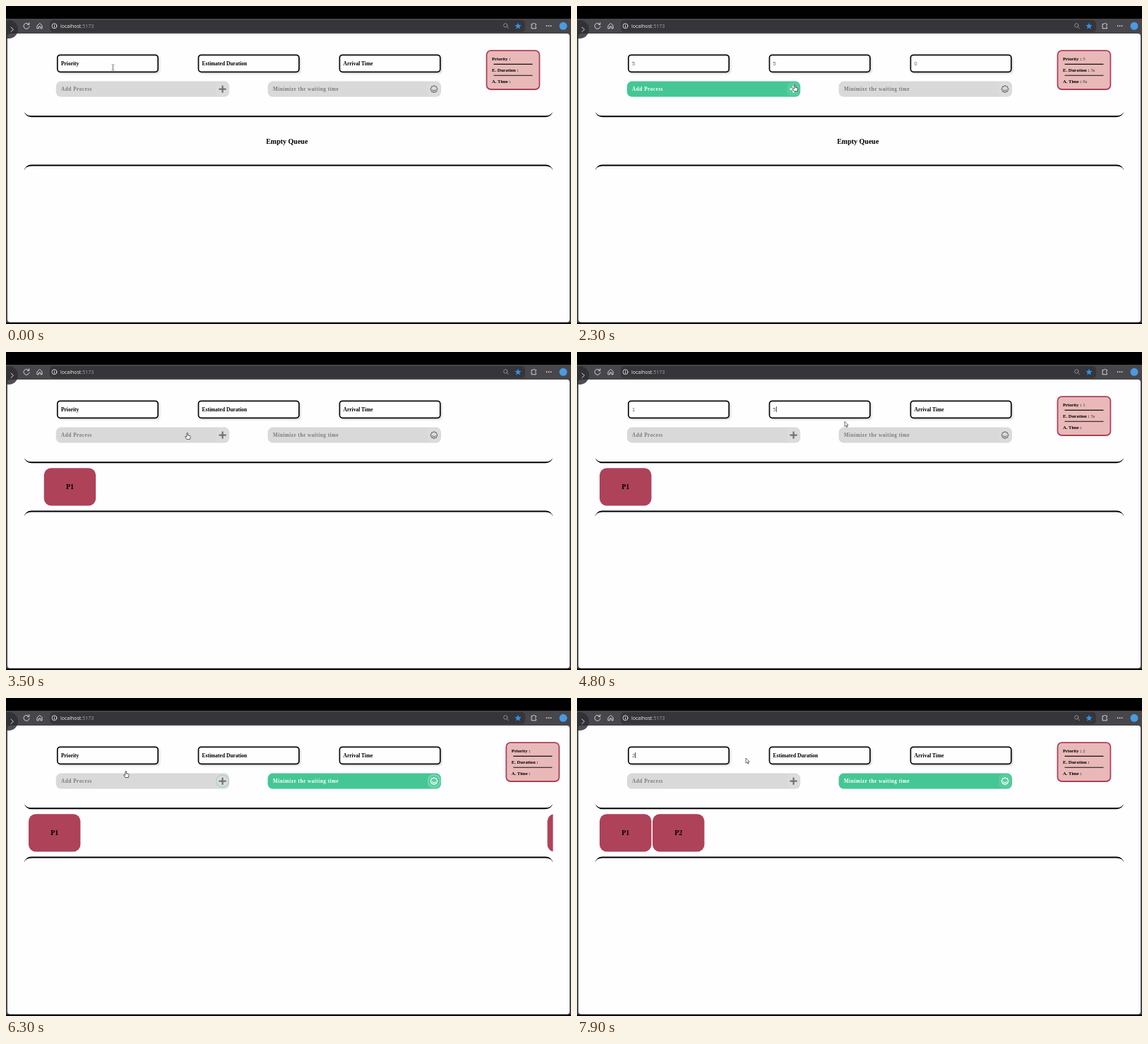
Write an HTML page that moves like this. It is 800 by 450 pixels and loops after 8000 ms.

```html
<!DOCTYPE html>
<html lang="en">
<head>
<meta charset="utf-8">
<title>Process queue</title>
<style>
  html, body { margin: 0; width: 100%; height: 100%; overflow: hidden; background: #000; }
  svg { display: block; width: 100%; height: 100%; }
  text { white-space: pre; }
  .serif { font-family: "Liberation Serif", "Times New Roman", serif; font-weight: bold; }
  .ui { font-family: "Open Sans", sans-serif; }
  .value { font: 7.5px "Liberation Sans", Arial, sans-serif; fill: #666; }
  .line { fill: none; stroke: #d5d5d8; stroke-width: 1; stroke-linecap: round; stroke-linejoin: round; }
</style>
</head>
<body>
<svg id="stage" viewBox="0 0 800 450">
  <defs>
    <clipPath id="page"><rect x="2" y="39" width="796" height="409" rx="4"/></clipPath>
    <clipPath id="lane"><rect x="26" y="150" width="748.5" height="80"/></clipPath>
    <filter id="soft" x="-10%" y="-30%" width="120%" height="170%"><feGaussianBlur stdDeviation="1.5"/></filter>
    <path id="rail" d="M26 149A10 8.3 0 0 0 36 157.3H764A10 8.3 0 0 0 774 149A10 6.3 0 0 1 764 155.3H36A10 6.3 0 0 1 26 149Z"/>
  </defs>

  <rect width="800" height="450"/>
  <rect y="18" width="800" height="430" fill="#47474b"/>
  <rect x="62" y="20" width="673" height="17" rx="5" fill="#36363a"/>
  <rect x="2" y="39" width="796" height="408.5" rx="4" fill="#fefdff"/>

  <circle cx="4" cy="33" r="13" fill="#2f2f32" opacity=".85"/>
  <path class="line" d="M7 30L10.5 33.2L7 36.4" stroke="#aaa"/>
  <path class="line" d="M32.3 26A4 4 0 1 0 33 29M32.8 23.7V26.3H30.2"/>
  <path class="line" d="M44.3 27.6L47.7 24.5L51.1 27.6V31.8H49V29H46.4V31.8H44.3Z"/>
  <circle class="line" cx="68.5" cy="28.2" r="3.5" stroke-width=".8"/>
  <path class="line" d="M68.5 28V30M68.5 26.4V26.5" stroke-width=".8"/>
  <text class="ui" x="77" y="30.7" font-size="7" fill="#f2f2f2">localhost<tspan fill="#a4a4a8">:5173</tspan></text>
  <circle class="line" cx="707.3" cy="27.4" r="2.7" style="stroke:#8b8b90"/>
  <path class="line" d="M709.4 29.6L711.6 31.8" style="stroke:#8b8b90"/>
  <path id="star" fill="#2f8fe8"/>
  <path class="line" d="M744.5 25.4H746.3A1.4 1.4 0 0 1 749 25.4H750.4V27.2A1.3 1.3 0 0 0 750.4 29.7V31.8H744.5Z"/>
  <g fill="#d5d5d8"><circle cx="765.6" cy="28.2" r=".9"/><circle cx="768.6" cy="28.2" r=".9"/><circle cx="771.6" cy="28.2" r=".9"/></g>
  <circle cx="789" cy="28.3" r="5.5" fill="#4a9be0"/>

  <g id="form"></g>
  <use href="#rail"/>
  <use href="#rail" transform="matrix(1 0 0 -1 0 381.8)"/>
  <text id="empty" class="serif" x="397.8" y="195" font-size="10" text-anchor="middle">Empty Queue</text>
  <g id="queue" clip-path="url(#lane)"></g>
  <g clip-path="url(#page)"><g id="card">
    <rect x="680.5" y="63.2" width="74.9" height="54.8" rx="6" fill="#e8b9b8" stroke="#ae4057" stroke-width="1.8"/>
    <path d="M690.5 82.4H745.5M690.5 98.2H745.5" stroke="#111" stroke-width="1.1"/>
  </g></g>
  <g id="tip">
    <rect x="302.5" y="88.3" width="142" height="12.4" fill="#4a4a4a"/>
    <text class="ui" x="306" y="96.6" font-size="5.9" fill="#fff">Please enter a number greater than or equal to 0</text>
  </g>

  <path id="beam" d="M-1.8 -4H-.4M.4 -4H1.8M0 -3.6V3.6M-1.8 4H-.4M.4 4H1.8" fill="none" stroke="#555" stroke-width=".8"/>
  <path id="arrow" d="M0 0V7.2L1.7 5.7L2.8 8.2L4 7.7L2.9 5.3H5.1Z" fill="#fff" stroke="#333" stroke-width=".7"/>
  <path id="hand" d="M-.8 .6C-.8 -.4 .8 -.4 .8 .6V3.4L3.6 4Q4.6 4.3 4.4 5.4L3.7 8.9H-.8L-3 5.9Q-3.2 4.6 -2 4.9L-.8 5.8Z" fill="#fff" stroke="#333" stroke-width=".8" stroke-linejoin="round"/>
</svg>
<script>
const LOOP = 8000, STEP = 100;
const GREEN = '#44c794', GREY = '#d9d9d9', DIM = '#7b7b7b';
const SENT = [2390, 6240];      // moments the form is submitted
const $ = id => document.getElementById(id);

function add(parent, tag, attrs, text) {
  const el = document.createElementNS('http://www.w3.org/2000/svg', tag);
  for (const k in attrs) el.setAttribute(k, attrs[k]);
  if (text) el.textContent = text;
  parent.appendChild(el);
  return el;
}
const show = (el, on) => el.setAttribute('visibility', on ? 'visible' : 'hidden');
const clamp = v => Math.max(0, Math.min(1, v));

// Cubic Bezier with the control points of the CSS "ease" keyword
function ease(p) {
  p = clamp(p);
  let lo = 0, hi = 1;
  const at = (s, a, b) => 3 * s * (1 - s) ** 2 * a + 3 * s * s * (1 - s) * b + s ** 3;
  for (let i = 0; i < 24; i++) {
    const mid = (lo + hi) / 2;
    if (at(mid, .25, .25) < p) lo = mid; else hi = mid;
  }
  return at(lo, .1, 1);
}

function ring(cx, cy, n, radius) {
  let d = '';
  for (let i = 0; i < n; i++) {
    const a = i / n * 2 * Math.PI - Math.PI / 2, r = radius(i, a);
    d += (i ? 'L' : 'M') + (cx + r * Math.cos(a)).toFixed(2) + ' ' + (cy + r * Math.sin(a)).toFixed(2);
  }
  return d + 'Z';
}
$('star').setAttribute('d', ring(725, 28.5, 10, i => i % 2 ? 2.2 : 4.8));

// typed: [from, to, value]; focus: [from, to]
const fields = [
  { x: 72, label: 'Priority', note: 'Priority : ', unit: '',
    typed: [[600, SENT[0], '5'], [4300, SENT[1], '1'], [7500, LOOP, '2']],
    focus: [[200, 1400], [4000, 4600], [6700, LOOP]] },
  { x: 271.7, label: 'Estimated Duration', note: 'E. Duration : ', unit: 's',
    typed: [[1500, SENT[0], '5'], [4700, SENT[1], '5']],
    focus: [[1400, 2000], [4600, 5100]] },
  { x: 471.6, label: 'Arrival Time', note: 'A. Time : ', unit: 's',
    typed: [[2100, SENT[0], '0'], [5300, SENT[1], '1']],
    focus: [[2000, 2300], [5100, 6100]] }
];

const form = $('form');
fields.forEach((f, i) => {
  const box = { x: f.x + .8, y: 69.3, width: 142.4, height: 24, rx: 4 };
  add(form, 'rect', { ...box, transform: 'translate(2 2)', fill: '#aaa', opacity: .6, filter: 'url(#soft)' });
  add(form, 'rect', { ...box, fill: '#fefdff', stroke: '#0a0a0a', 'stroke-width': 1.7 });
  f.hint = add(form, 'text', { class: 'serif', x: f.x + 5.9, y: 83.5, 'font-size': 7.5 }, f.label);
  f.value = add(form, 'text', { class: 'value', x: f.x + 5.9, y: 83.6 });
  f.caret = add(form, 'rect', { y: 77, width: .8, height: 8, fill: '#222' });
  const row = add($('card'), 'text', { class: 'serif', x: 688, y: 76.9 + 15.8 * i, 'font-size': 6.7 }, f.note);
  f.copy = add(row, 'tspan', { 'font-weight': 'normal', fill: '#333' });
});

function button(x, label, icon) {
  const b = {};
  b.back = add(form, 'rect', { x, y: 106.6, width: 245.4, height: 22, rx: 7 });
  b.cell = add(form, 'rect', { x: x + 226.5, y: 108, width: 18, height: 19, rx: 6, fill: '#fff', opacity: .1 });
  b.text = add(form, 'text', { class: 'serif', x: x + 7.3, y: 120, 'font-size': 7.2, 'letter-spacing': .52 }, label);
  b.halo = add(form, 'circle', { cx: x + 235.6, cy: 117.6, r: 8.6, fill: 'none', 'stroke-width': 1.3, 'stroke-dasharray': '1.6 .6' });
  b.icon = add(form, 'path', { d: icon, fill: 'none' });
  b.paint = (on, glow) => {
    const ink = on ? '#fff' : DIM;
    b.back.setAttribute('fill', on ? GREEN : GREY);
    b.text.setAttribute('fill', ink);
    b.icon.setAttribute('stroke', on ? '#fff' : '#737373');
    b.halo.setAttribute('stroke', on ? '#a5e8cd' : '#7fcfae');
    b.halo.setAttribute('opacity', glow);
  };
  return b;
}
const addBtn = button(70.8, 'Add Process', 'M301.5 117.6H311.7M306.6 112.5V122.7');
addBtn.icon.setAttribute('stroke-width', 2.2);
const gear = ring(606, 117.6, 64, (i, a) => 4.5 + .45 * Math.cos(8 * a)) + 'M603.6 118.2A2.5 2.5 0 0 0 608.4 118.2';
const sortBtn = button(370.6, 'Minimize the waiting time', gear);
sortBtn.icon.setAttribute('stroke-width', 1.1);

const boxes = [{ name: 'P1', x: 32, start: 2405 }, { name: 'P2', x: 107, start: 6266 }];
boxes.forEach(b => {
  b.el = add($('queue'), 'g', {});
  add(b.el, 'rect', { y: 164.2, width: 73.4, height: 53.2, rx: 10, fill: '#ae4259' });
  add(b.el, 'text', { class: 'serif', x: 36.8, y: 194.2, 'font-size': 10, 'text-anchor': 'middle' }, b.name);
});

// Pointer stops: [time, x, y]
const stops = [
  [0, 151.5, 87], [700, 151.5, 87], [1000, 303.5, 78], [1800, 303.5, 78], [2000, 540, 84], [2150, 540, 84],
  [2350, 265.3, 117], [3400, 265.3, 117], [4000, 150, 84], [4350, 150, 84], [4600, 330, 82], [4700, 330, 82],
  [4800, 379, 98.3], [5000, 530, 84], [5600, 530, 84], [6100, 169.7, 103.6], [6300, 169.7, 103.6],
  [6600, 165.5, 84], [7700, 165.5, 84], [7900, 239, 85], [LOOP, 239, 85]
];
function pointer(t) {
  let i = 1;
  while (i < stops.length - 1 && stops[i][0] < t) i++;
  const [a, x, y] = stops[i - 1], [b, u, v] = stops[i];
  const p = clamp((t - a) / (b - a)), k = p * p * (3 - 2 * p);
  return [x + (u - x) * k, y + (v - y) * k];
}

// Slides right after each submission, back in when typing starts again
function cardShift(t) {
  const slide = from => ease((t - from) / 400);
  return 150 * (slide(SENT[0]) - slide(4300) + slide(SENT[1]) - slide(7500));
}

function draw(t) {
  const within = ([from, to]) => t >= from && t < to;
  let filled = 0;
  for (const f of fields) {
    const entry = f.typed.find(within), focus = f.focus.find(within);
    const value = entry ? entry[2] : '';
    if (entry) filled++;
    show(f.hint, !entry);
    f.value.textContent = value;
    f.copy.textContent = value && value + f.unit;
    const since = focus ? t - Math.max(focus[0], entry ? entry[0] : 0) : 0;
    show(f.caret, focus && since % 1000 < 500);
    f.caret.setAttribute('x', f.x + 5.8 + (entry ? 4.4 : 0));
  }

  const glow = within([SENT[1], 6500]) ? 1 - (t - SENT[1]) / 260 : 0;
  addBtn.paint(filled === 3, glow);
  sortBtn.paint(t >= SENT[1], glow);

  show($('empty'), t < SENT[0]);
  for (const b of boxes) {
    const x = 775 + (b.x - 775) * ease((t - b.start) / 1400);
    b.el.setAttribute('transform', `translate(${x.toFixed(2)} 0)`);
  }
  $('card').setAttribute('transform', `translate(${cardShift(t).toFixed(2)} 0)`);
  show($('tip'), within([1300, 1500]));

  const [x, y] = pointer(t);
  const onField = y > 68 && y < 95 && fields.some(f => x > f.x && x < f.x + 144);
  const onButton = y > 103 && y < 129 && ((x > 70 && x < 317) || (x > 370 && x < 617));
  const kind = onField ? 'beam' : onButton ? 'hand' : 'arrow';
  for (const id of ['beam', 'hand', 'arrow']) {
    show($(id), id === kind && !within([1500, 1800]));
    $(id).setAttribute('transform', `translate(${x.toFixed(2)} ${y.toFixed(2)})`);
  }
}

const began = performance.now();
function tick() {
  const t = (performance.now() - began) % LOOP;
  draw(Math.floor(t / STEP) * STEP);
  requestAnimationFrame(tick);
}
tick();
</script>
</body>
</html>
```
